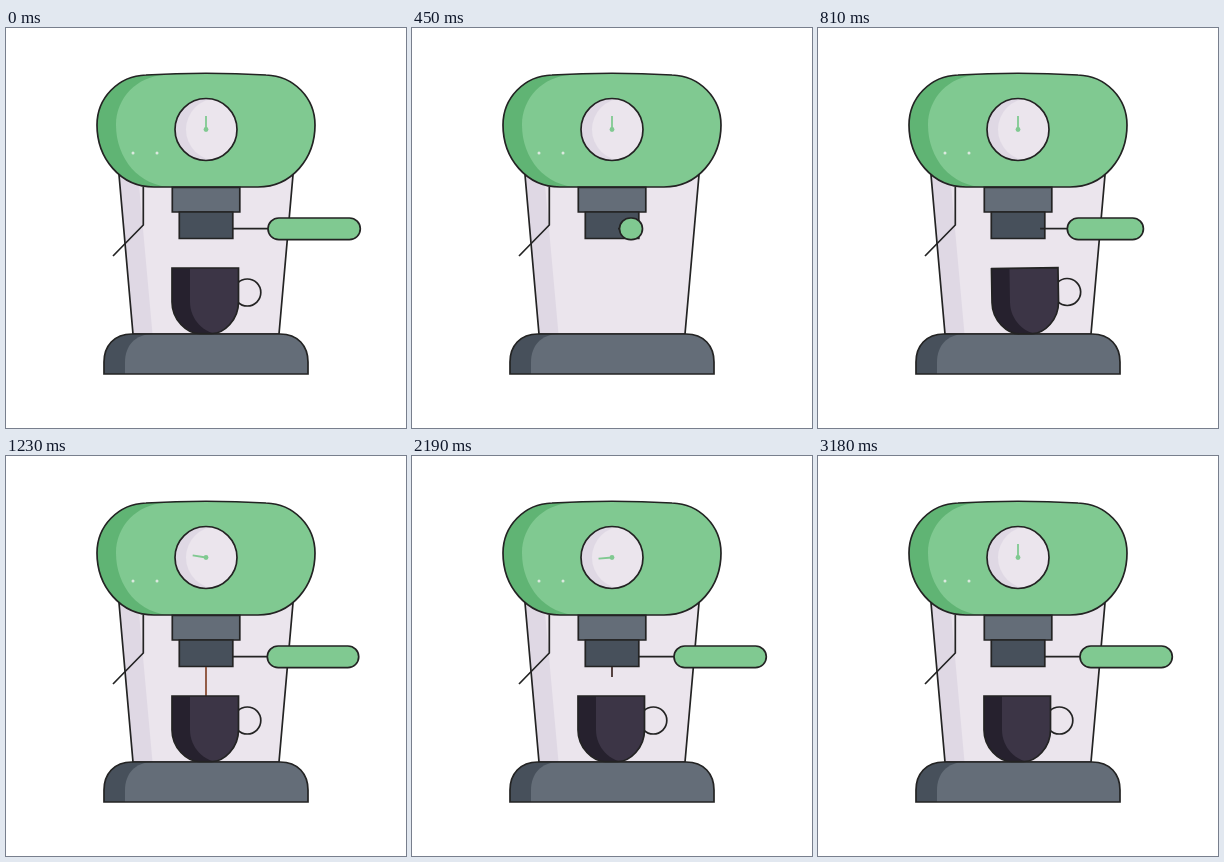
An HTML page with a canvas for the animation above (4.02 s loop, 400 px wide and 400 px high).

```html
<!DOCTYPE html>
<html lang="en">
<head>
<meta charset="utf-8">
<title>Coffee machine</title>
<style>
  html, body { margin: 0; width: 100%; height: 100%; overflow: hidden; background: #fff; }
  canvas { display: block; width: 400px; height: 400px; }
</style>
</head>
<body>
<canvas id="stage" width="400" height="400"></canvas>
<script>
const ctx = document.getElementById('stage').getContext('2d');
const LOOP = 4020;
const INK = '#232323', GREEN = '#80c991', GREEN_DARK = '#60b474';
const PALE = '#ebe5ed', PALE_DARK = '#dfd8e4', GREY = '#646d78', GREY_DARK = '#47505b';
const CUP = '#3c3546', CUP_DARK = '#26212e', COFFEE = '#83452a', DRIP = '#3b2622';

const head = new Path2D('M148 159C114 159 91 130 91 97C91 70 112 48 140 47Q200 43.5 260 47C288 48 309 70 309 97C309 130 286 159 252 159Z');
const body = new Path2D('M112.4 140L127 306H273L287.6 140Z');
const bodyLight = new Path2D('M131.5 140L146.5 306H300V140Z');
const base = new Path2D('M98 346V334C98 318 108 306 126 306H274C292 306 302 318 302 334V346Z');
const cup = new Path2D('M166 240H232.5V274C232.5 292 218 305.5 206 305.5H193C181 305.5 166 292 166 274Z');
const wire = new Path2D('M137.3 159V197L107 228');
const dial = circle(200, 101.5, 31);
const cupRing = circle(241.3, 264.5, 13.5);

const progress = (t, start, length) => Math.min(1, Math.max(0, (t - start) / length));
const expoOut = u => u >= 1 ? 1 : 1 - Math.pow(2, -10 * u);
const cubicIn = u => u * u * u;
const backOut = u => 1 + 3 * Math.pow(u - 1, 3) + 2 * Math.pow(u - 1, 2);

function circle(x, y, r) {
  const p = new Path2D();
  p.arc(x, y, r, 0, Math.PI * 2);
  return p;
}

function outline(path, fill) {
  if (fill) {
    ctx.fillStyle = fill;
    ctx.fill(path);
  }
  ctx.strokeStyle = INK;
  ctx.lineWidth = 1.7;
  ctx.stroke(path);
}

// Dark shape with a lighter copy shifted right inside it
function shaded(path, dark, light, shift, lightPath = path) {
  ctx.fillStyle = dark;
  ctx.fill(path);
  ctx.save();
  ctx.clip(path);
  ctx.translate(shift, 0);
  ctx.fillStyle = light;
  ctx.fill(lightPath);
  ctx.restore();
  outline(path);
}

function line(x1, y1, x2, y2, color, width = 1.7) {
  ctx.strokeStyle = color;
  ctx.lineWidth = width;
  ctx.beginPath();
  ctx.moveTo(x1, y1);
  ctx.lineTo(x2, y2);
  ctx.stroke();
}

function block(x, y, w, h, fill) {
  const p = new Path2D();
  p.rect(x, y, w, h);
  outline(p, fill);
}

function dot(x, y, r, color) {
  ctx.fillStyle = color;
  ctx.fill(circle(x, y, r));
}

function drawGauge(t) {
  shaded(dial, PALE_DARK, PALE, 11);
  const there = t < 1010 ? 0 : backOut(progress(t, 1010, 900));
  const back = t < 2280 ? 0 : backOut(progress(t, 2280, 900));
  const angle = -95 * (there - back) * Math.PI / 180;
  ctx.save();
  ctx.translate(200, 101.5);
  ctx.rotate(angle);
  line(0, 0, 0, -13.5, GREEN, 1.8);
  ctx.restore();
  dot(200, 101.5, 2.4, GREEN);
}

function drawCoffee(t) {
  if (t > 1080 && t < 1980) {
    const bottom = 211 + 29 * progress(t, 1080, 120);
    const top = 211 + 29 * progress(t, 1860, 120);
    line(200, top, 200, bottom, COFFEE);
  }
  for (const start of [2010, 2562]) {
    const u = progress(t, start, 360);
    if (u === 0 || u === 1) continue;
    const tip = 211 + 40 * u * u;
    const top = Math.max(211, tip - 11);
    if (top < 240) line(200, top, 200, Math.min(240, tip), DRIP);
  }
}

function drawHandle(t) {
  const s = t < 600 ? 1 - cubicIn(progress(t, 0, 430)) : expoOut(progress(t, 600, 1000));
  const left = 207.5 + 54.5 * s;
  const right = 230.5 + 123.8 * s;
  line(206 + 21 * s, 200.6, left, 200.6, INK);
  const pill = new Path2D();
  pill.roundRect(left, 190, right - left, 21.7, 10.85);
  outline(pill, GREEN);
}

function drawCup(t) {
  let x, tilt;
  if (t < 510) {
    const u = cubicIn(progress(t, 0, 420));
    x = -275 * u;
    tilt = -30 * u;
  } else {
    const u = 1 - expoOut(progress(t, 510, 600));
    x = 256 * u;
    tilt = -30 * u;
  }
  ctx.save();
  ctx.translate(210 + x, 273);
  ctx.rotate(tilt * Math.PI / 180);
  ctx.translate(-210, -273);
  outline(cupRing);
  shaded(cup, CUP_DARK, CUP, 18);
  ctx.restore();
}

function draw(t) {
  ctx.fillStyle = '#fff';
  ctx.fillRect(0, 0, 400, 400);
  shaded(body, PALE_DARK, PALE, 0, bodyLight);
  outline(wire);
  shaded(head, GREEN_DARK, GREEN, 19);
  dot(127, 125, 1.5, '#dbe9df');
  dot(151, 125, 1.5, '#dbe9df');
  drawGauge(t);
  shaded(base, GREY_DARK, GREY, 21);
  block(166.3, 159.3, 67.5, 24.7, GREY);
  block(173.3, 184, 53.5, 26.5, GREY_DARK);
  drawCoffee(t);
  drawHandle(t);
  drawCup(t);
}

const begin = performance.now();
function tick() {
  const t = (performance.now() - begin) % LOOP;
  draw(Math.floor(t / 30) * 30);
  requestAnimationFrame(tick);
}
tick();
</script>
</body>
</html>
```
